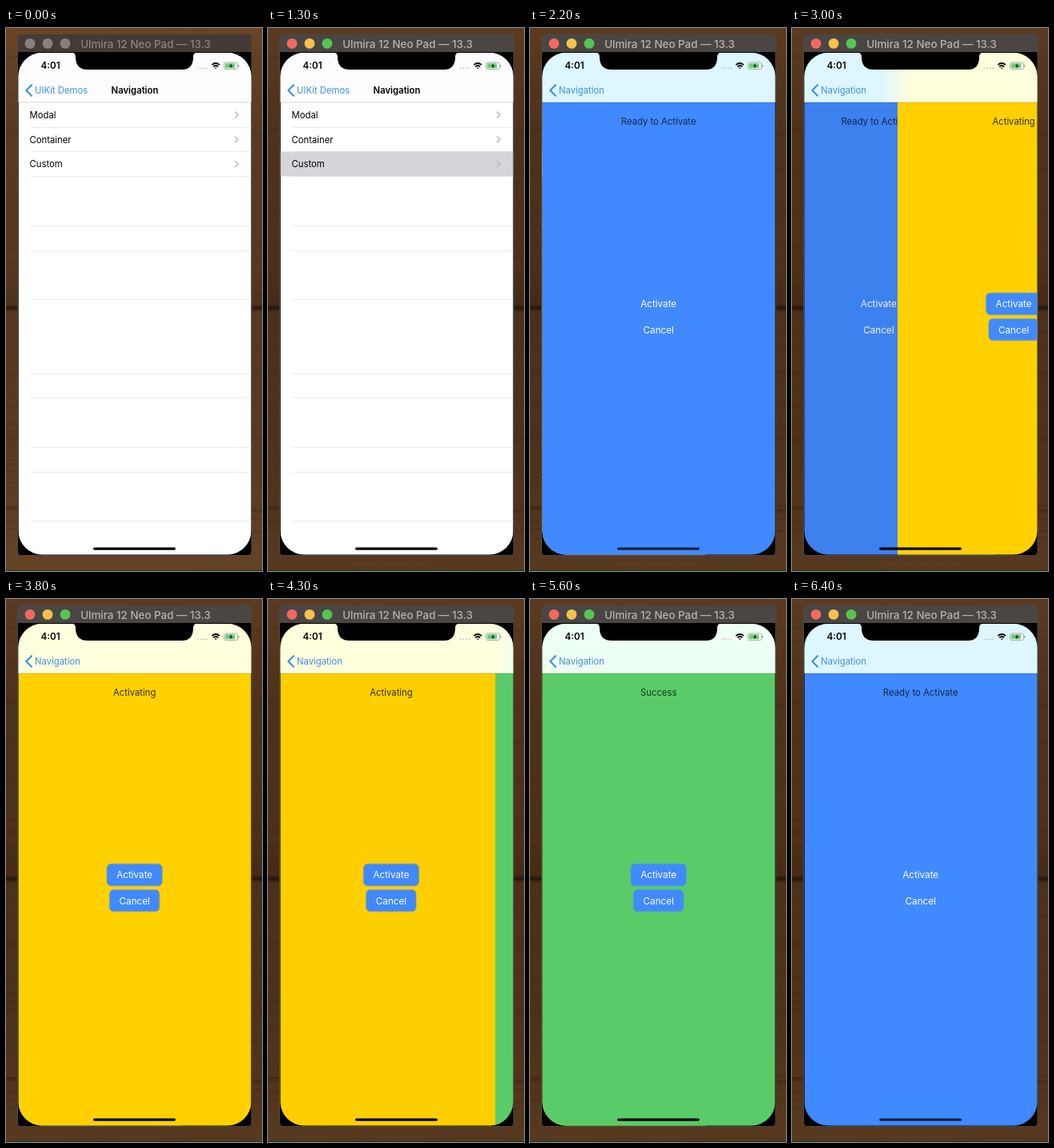
An HTML page for the animation above (6.5 s loop, 320 by 679 pixels).

```html
<!DOCTYPE html>
<html lang="en">
<head>
<meta charset="utf-8">
<title>Navigation demo</title>
<style>
  html, body { margin: 0; width: 100%; height: 100%; overflow: hidden; background: #4a2e17; }
  svg { display: block; width: 100%; height: 100%; }
  text { font: 11.3px Inter, "Open Sans", sans-serif; }
  .bold { font-weight: 600; }
  .mid { text-anchor: middle; }
  .link { fill: #3f90e2; }
  .button { font-size: 11.7px; fill: #fff; }
</style>
</head>
<body>
<svg viewBox="0 0 320 679">
  <defs>
    <linearGradient id="wood" x2="0" y2="1">
      <stop offset="0" stop-color="#6a4526"/>
      <stop offset=".2" stop-color="#59391f"/>
      <stop offset=".44" stop-color="#58381f"/>
      <stop offset=".509" stop-color="#50321b"/>
      <stop offset=".515" stop-color="#2a180c"/>
      <stop offset=".523" stop-color="#573820"/>
      <stop offset=".8" stop-color="#5a3a20"/>
      <stop offset="1" stop-color="#654325"/>
    </linearGradient>
    <linearGradient id="barTint" gradientUnits="userSpaceOnUse" y1="0" y2="0">
      <stop id="tintUnder"/>
      <stop id="tintOver" offset="1"/>
    </linearGradient>
    <clipPath id="screen"><rect x="15.5" y="31" width="291" height="627.5" rx="29.5"/></clipPath>
  </defs>

  <rect width="320" height="679" fill="url(#wood)"/>
  <g id="grain" stroke="#2a1506"></g>
  <rect id="shade" width="320" height="679" opacity=".14"/>
  <rect y="678" width="320" height="1" fill="#123c10"/>

  <rect x="14.5" y="8" width="292.5" height="651.5" rx="4" fill="#000" stroke="#4f4744" stroke-width="1"/>
  <path id="titleBar" d="M15 30V12q0-4 4-4H303q4 0 4 4V30Z"/>
  <g id="lights"></g>
  <text id="windowTitle" class="mid" x="174.5" y="25" style="font-size:13.4px;font-weight:500">Ulmira 12 Neo Pad — 13.3</text>

  <g clip-path="url(#screen)">
    <g id="pages"></g>
    <rect x="15" y="31" width="292" height="62" fill="url(#barTint)"/>
    <rect x="15" y="92.6" width="292" height=".7" opacity=".24"/>
    <path d="M32 71.2 25.3 78 32 84.8" fill="none" stroke="#3f90e2" stroke-width="2.1" stroke-linecap="round" stroke-linejoin="round"/>
    <text id="oldBack" class="link" x="36" y="82">UIKit Demos</text>
    <text id="newBack" class="link" x="36" y="82">Navigation</text>
    <text id="heading" class="bold mid" x="161" y="82">Navigation</text>

    <text class="bold" x="43.5" y="51.3" style="font-size:11.7px">4:01</text>
    <path d="M240.5 50.3h13" stroke="#b4b9c2" stroke-width="1.7" stroke-linecap="round" stroke-dasharray="0 3.6"/>
    <g fill="none" stroke="#000" stroke-width="1.7">
      <path d="M257.4 46.1q4.8-4.2 9.6 0M259.2 48.3q3-2.6 6 0"/>
      <path d="M260.7 49.6 262.2 51.3 263.7 49.6Z" fill="#000" stroke="none"/>
    </g>
    <rect x="272.5" y="43" width="17" height="8.6" rx="2.4" fill="#fff" stroke="#929994" stroke-width=".8"/>
    <rect x="273.8" y="44.3" width="12.5" height="6" rx="1.2" fill="#6ccf7b"/>
    <path d="M290.8 46v2.7" stroke="#929994" stroke-width="1.1"/>
    <path d="M282.2 44.3 278.6 47.8h2.3l-.8 2.8 3.6-3.6h-2.2Z" fill="#152318"/>
    <rect id="homeLine" x="109" y="649.4" width="103" height="3.3" rx="1.6"/>
  </g>
  <path d="M81 30q6 1 6 6v2q1 14 15 14H220q13 0 14-14v-2q0-5 6-6Z"/>
</svg>

<script>
const LOOP = 6500, STEP = 100, LEFT = 15.5, WIDTH = 291;
const ACTIVATE_AT = 900, SELECT_AT = 1200, SLIDE_TIME = 500;
const PARALLAX = 0.3, DIM = 0.1, SOFT = 18;
const BLUE = '#4189fe';

const PAGES = {
  list:   { bar: '#fdfdfd' },
  blue:   { bar: '#ddf6ff', fill: BLUE, label: 'Ready to Activate', ink: '#10294f' },
  yellow: { bar: '#fffedd', fill: '#ffd100', label: 'Activating', ink: '#352d18' },
  green:  { bar: '#eefff4', fill: '#5acb69', label: 'Success', ink: '#143819' },
};
const SLIDES = [
  { at: 1380, from: 'list', to: 'blue' },
  { at: 2878, from: 'blue', to: 'yellow' },
  { at: 4280, from: 'yellow', to: 'green' },
  { at: 5680, from: 'green', to: 'blue', pop: true },
];

const $ = id => document.getElementById(id);
const set = (el, attrs) => {
  for (const key in attrs) el.setAttribute(key, attrs[key]);
};
const rect = (x, y, w, h, fill, more = '') =>
  `<rect x="${x}" y="${y}" width="${w}" height="${h}" fill="${fill}" ${more}/>`;

function listMarkup() {
  const rows = ['Modal', 'Container', 'Custom'].map((name, i) => {
    const y = 108.6 + i * 30.8;
    return `<text x="29.5" y="${y + 4.1}">${name}</text>
      <path d="M286 ${y - 4}l4 4-4 4" fill="none" stroke="#b9b9be" stroke-width="1.4"/>`;
  });
  const lines = [1, 2, 3, 5, 6, 8, 11, 12, 14, 15, 17]
    .map(n => rect(30, Math.floor(93.2 + n * 30.8), 277, 1, '#ececed'));
  return rect(LEFT, 31, WIDTH, 628, '#fff') + lines.join('') +
    `<g id="selection">${rect(LEFT, 154.5, WIDTH, 31, '#d7d5da')}</g>` + rows.join('');
}

function stateMarkup({ fill, label, ink }) {
  const edge = `rx="5" stroke="${BLUE}" stroke-opacity=".35" stroke-width="2"`;
  const button = (name, x, y, w) => rect(x, y, w, 26.8, BLUE, edge) +
    `<text class="button mid" x="160.7" y="${y + 17.7}">${name}</text>`;
  return rect(LEFT, 31, WIDTH, 628, fill) +
    `<text class="mid" x="160.7" y="121.4" fill="${ink}">${label}</text>` +
    button('Activate', 126.3, 331.6, 68.8) + button('Cancel', 129.6, 363.8, 62);
}

$('pages').innerHTML = Object.entries(PAGES).map(([name, page]) =>
  `<g id="${name}">${page.fill ? stateMarkup(page) : listMarkup()}
    <rect class="dim" x="${LEFT}" y="31" width="${WIDTH}" height="628"/></g>`).join('');

$('lights').innerHTML = [30, 52, 74].map(x => `<circle cx="${x}" cy="19.4" r="6.4"/>`).join('');

let seed = 7;
const random = () => (seed = seed * 16807 % 2147483647) / 2147483647;
$('grain').innerHTML = Array.from({ length: 40 }, () => {
  const y = random() * 679;
  return `<path d="M0 ${y}L320 ${y + random() * 10 - 5}" stroke-width="${1 + random() * 4}" opacity="${random() * .1}"/>`;
}).join('');

// cubic-bezier(.38, .7, .125, 1)
function ease(x) {
  if (x <= 0 || x >= 1) return x <= 0 ? 0 : 1;
  const curve = (s, a, b) => 3 * (1 - s) ** 2 * s * a + 3 * (1 - s) * s * s * b + s ** 3;
  let low = 0, high = 1;
  for (let i = 0; i < 24; i++) {
    const s = (low + high) / 2;
    if (curve(s, .38, .125) < x) low = s; else high = s;
  }
  return curve(low, .7, 1);
}

function place(name, x, dim) {
  const page = $(name);
  set(page, { transform: `translate(${x} 0)`, visibility: 'visible' });
  set(page.querySelector('.dim'), { opacity: dim });
}

function drawPages(t) {
  const slide = SLIDES.filter(s => s.at <= t).pop() || SLIDES[0];
  const progress = ease((t - slide.at) / SLIDE_TIME);
  const cover = slide.pop ? 1 - progress : progress;
  const [under, over] = slide.pop ? [slide.to, slide.from] : [slide.from, slide.to];
  const x = WIDTH * (1 - cover);

  for (const name in PAGES) set($(name), { visibility: 'hidden' });
  place(under, -PARALLAX * WIDTH * cover, DIM * cover);
  place(over, x, 0);

  const edge = LEFT + x + SOFT * (2 * x / WIDTH - 1);
  set($('barTint'), { x1: edge - SOFT, x2: edge + SOFT });
  set($('tintUnder'), { 'stop-color': PAGES[under].bar });
  set($('tintOver'), { 'stop-color': PAGES[over].bar });

  const current = progress < .5 ? slide.from : slide.to;
  set($('homeLine'), { opacity: current === 'blue' ? .76 : 1 });
}

function drawHeading(t) {
  const p = ease((t - SLIDES[0].at) / SLIDE_TIME);
  set($('heading'), { transform: `translate(${-95 * p} 0)`, opacity: Math.max(0, 1 - 1.5 * p) });
  set($('newBack'), { transform: `translate(${95 * (1 - p)} 0)`, opacity: p * p });
  set($('oldBack'), { transform: `translate(${-70 * p} 0)`, opacity: Math.max(0, 1 - 1.5 * p) });
}

function drawWindow(active) {
  set($('shade'), { visibility: active ? 'visible' : 'hidden' });
  set($('titleBar'), { fill: active ? '#4a4643' : '#453b36' });
  set($('windowTitle'), { fill: active ? '#b7b2ae' : '#8a837e' });
  const colors = active ? ['#f3695f', '#f6c24c', '#55c552'] : Array(3).fill('#87817d');
  [...$('lights').children].forEach((light, i) => set(light, { fill: colors[i] }));
}

function frame() {
  const t = Math.floor(performance.now() % LOOP / STEP) * STEP;
  drawWindow(t >= ACTIVATE_AT);
  set($('selection'), { opacity: t >= SELECT_AT ? 1 : 0 });
  drawPages(t);
  drawHeading(t);
  requestAnimationFrame(frame);
}
frame();
</script>
</body>
</html>
```
